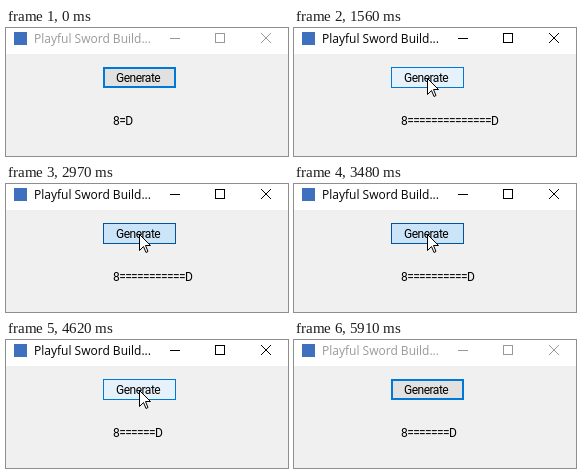
An HTML page with a canvas for the animation above (5.97 s loop, 282x128 px).

```html
<!DOCTYPE html>
<html lang="en">
<head>
<meta charset="utf-8">
<title>Window</title>
<style>
html, body { margin: 0; overflow: hidden; background: #f0f0f0; }
canvas { display: block; }
</style>
</head>
<body>
<canvas id="stage" width="282" height="128"></canvas>
<script>
const c = document.getElementById('stage').getContext('2d');
const LOOP = 5970, STEP = 30;
const UI_FONT = '12px Roboto, sans-serif';
const arrow = new Path2D('M.5 .5V16.5L4.5 12.5L7 18.5L9 17.5L6.5 11.5H11.5Z');

// press time, release time, settle time, bar length after release
const clicks = [
  [1410, 1530, 1560, 14], [1950, 2010, 2040, 7], [2430, 2520, 2520, 11],
  [2970, 3060, 3060, 10], [3480, 3540, 3570, 8], [4020, 4110, 4140, 12],
  [4560, 4620, 4620, 6], [5040, 5100, 5100, 7]
];

// fill, border colour, border width
const looks = {
  idle: ['#e1e1e1', '#0078d7', 2],
  hover: ['#e5f1fb', '#0078d7', 1],
  down: ['#cce4f7', '#005499', 1],
  fade: ['#d9ebf9', '#0066b8', 1]
};

function rect(color, x, y, w, h) {
  c.fillStyle = color;
  c.fillRect(x, y, w, h);
}

function text(str, x, y, font, color, spacing = 0) {
  c.font = font;
  c.letterSpacing = spacing + 'px';
  c.fillStyle = color;
  c.fillText(str, x, y);
}

function pointer(t) {
  if (t < 480 || t >= 5490) return null;
  if (t < 870) {
    const left = (1 - (t - 480) / 390) ** 1.655;
    return [133 + 147 * left, 51 + left];
  }
  if (t < 5280) return [133, t < 1200 ? 51 : 50];
  const gone = ((t - 5250) / 240) ** 1.5;
  return [133 + 152 * gone, 50 - 24 * gone];
}

function titleBar(active) {
  const color = active ? '#000' : '#999';
  rect('#fff', 0, 0, 282, 26);
  rect('#3f70bd', 8, 4, 13, 13);
  text('Playful Sword Build...', 28, 15, '12px "Open Sans", sans-serif', color);
  rect(color, 164, 10, 10, 1);
  c.strokeStyle = color;
  c.lineWidth = 1;
  c.strokeRect(209.5, 5.5, 9, 9);
  c.beginPath();
  c.moveTo(255, 5);
  c.lineTo(265, 15);
  c.moveTo(265, 5);
  c.lineTo(255, 15);
  c.stroke();
}

function button([fill, edge, line]) {
  rect(edge, 97, 39, 73, 21);
  rect(fill, 97 + line, 39 + line, 73 - 2 * line, 21 - 2 * line);
  text('Generate', 110, 54, UI_FONT, '#000', -0.5);
}

function draw(now) {
  const t = Math.floor(now % LOOP / STEP) * STEP;
  const at = pointer(t);
  let state = at && at[0] < 170 ? 'hover' : 'idle';
  let length = 1;
  for (const [press, release, settle, next] of clicks) {
    if (t >= release) length = next;
    if (t >= press && t < settle) state = t < release ? 'down' : 'fade';
  }

  rect('#f0f0f0', 0, 0, 282, 128);
  titleBar(t >= 1410 && t < 5910);
  button(looks[state]);
  text('8' + '='.repeat(length) + 'D', 107, 97, UI_FONT, '#000', -0.6);

  if (at) {
    c.save();
    c.translate(Math.round(at[0]), Math.round(at[1]));
    c.fillStyle = '#fff';
    c.fill(arrow);
    c.strokeStyle = '#000';
    c.lineWidth = 1;
    c.stroke(arrow);
    c.restore();
  }
}

const start = performance.now();
function frame() {
  draw(performance.now() - start);
  requestAnimationFrame(frame);
}
frame();
</script>
</body>
</html>
```
